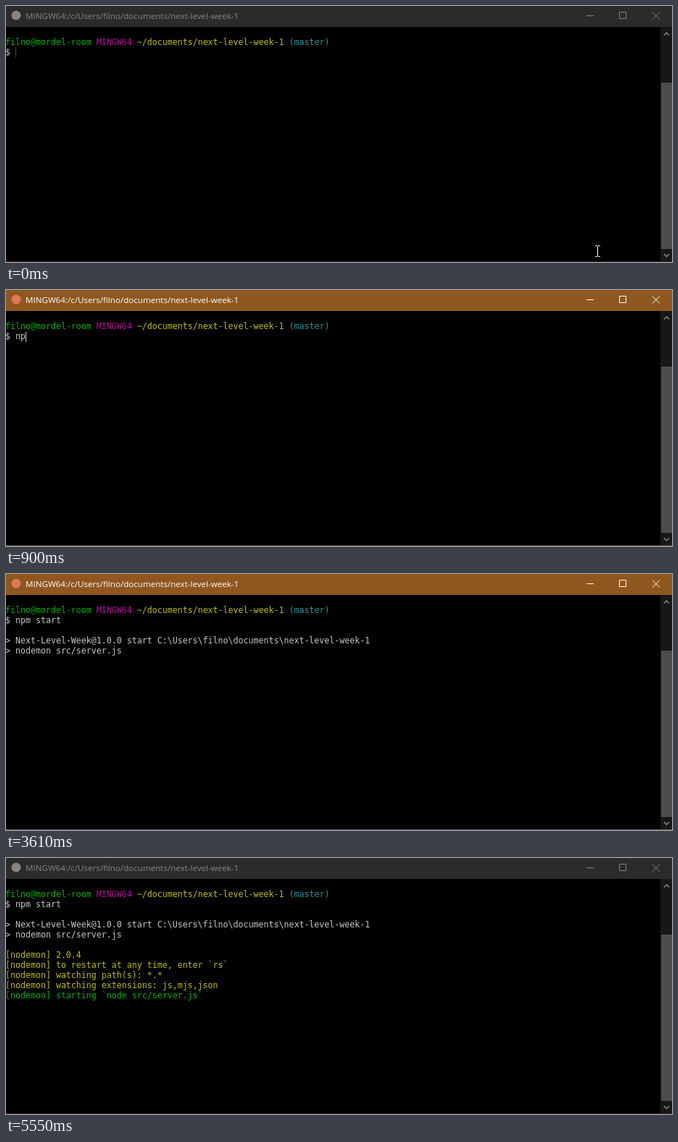
Recreate the animation shown at these times as an HTML page. Size 919 by 354 pixels, loop 5.71 s.

```html
<!DOCTYPE html>
<html lang="en">
<head>
<meta charset="utf-8">
<title>Terminal</title>
<style>
  html, body { margin: 0; width: 100%; height: 100%; overflow: hidden; background: #000; }
  #stage {
    --bar: #2b2b2b; --ink: #858585; --badge: #8c8480; --edge: #3b1a2a;
    position: relative; width: 919px; height: 354px; overflow: hidden; background: #000;
  }
  #stage.active { --bar: #8f571f; --ink: #fff; --badge: #e0785a; --edge: #6e5a58; }
  #bar { position: absolute; left: 0; top: 0; width: 919px; height: 29px; background: var(--bar); }
  #title {
    position: absolute; left: 27px; top: 0; white-space: pre; color: var(--ink);
    font: 11.6px/28px "Open Sans", "Noto Sans", sans-serif;
  }
  #term div {
    position: absolute; left: -1px; height: 14px; white-space: pre; color: #c8c8c8;
    font: 11.627px/14px "DejaVu Sans Mono", monospace;
  }
  #term .green { color: #00b400; }
  #term .magenta { color: #b4109e; }
  #term .yellow { color: #bfbf00; }
  #term .cyan { color: #1f9a9a; }
  #caret {
    position: absolute; top: 58px; width: 1px; height: 14px;
    background: repeating-linear-gradient(#8c8c8c 0 1px, #000 1px 2px);
  }
  .active #caret { background: #d0d0d0; }
  svg { position: absolute; left: 0; top: 0; }
</style>
</head>
<body>
<div id="stage">
  <div id="bar"></div>
  <div id="title">MINGW64:/c/Users/filno/documents/next-level-week-1</div>
  <div id="term">
    <div data-row="0"><span class="green">filno@mordel-room</span> <span class="magenta">MINGW64</span> <span class="yellow">~/documents/next-level-week-1</span> <span class="cyan">(master)</span></div>
    <div data-row="1">$ <span id="typed"></span></div>
    <div data-row="3" data-at="3610">&gt; Next-Level-Week@1.0.0 start C:\Users\filno\documents\next-level-week-1</div>
    <div data-row="4" data-at="3610">&gt; nodemon src/server.js</div>
    <div data-row="6" data-at="3930" class="yellow">[nodemon] 2.0.4</div>
    <div data-row="7" data-at="3930" class="yellow">[nodemon] to restart at any time, enter `rs`</div>
    <div data-row="8" data-at="3930" class="yellow">[nodemon] watching path(s): *.*</div>
    <div data-row="9" data-at="3930" class="yellow">[nodemon] watching extensions: js,mjs,json</div>
    <div data-row="10" data-at="4000" class="green">[nodemon] starting `node src/server.js`</div>
  </div>
  <div id="caret"></div>
  <svg width="919" height="354" fill="none">
    <circle cx="14" cy="13" r="6.5" fill="var(--badge)"/>
    <g stroke="var(--ink)">
      <path d="M801 13.5h10M846.5 8.5h9v9h-9z"/>
      <path d="M892 8.500l10 10m0-10l-10 10"/>
    </g>
    <rect x="903" y="29" width="16" height="325" fill="#171717"/>
    <rect x="904" y="106" width="15" height="230" fill="#4d4d4d"/>
    <path d="M908 40.500l3.500-3.500 3.500 3.500M908 343l3.500 3.500 3.500-3.500" stroke="#8a8a8a" stroke-width="1.500"/>
    <rect y="353" width="919" height="1" fill="var(--edge)"/>
    <path id="mouse" d="M-3 .5h3m1 0h3M.5 1v14M-3 15.500h3m1 0h3" stroke="#fff"/>
  </svg>
</div>
<script>
  const LOOP = 5710;
  const COMMAND = "npm start";
  const KEY_TIMES = [670, 900, 980, 1210, 1280, 1680, 1830, 1910, 2140];
  const CARET_OFF = 2520;
  const FOCUS = [210, 5550];

  // [time, x, y]; no position means the pointer is hidden
  const POINTER = [
    [0, 816, 331], [70, 811, 316], [140, 802, 295], [210, 799, 285], [290, 797, 289],
    [670],
    [3700, 797, 289], [3780, 812, 280], [3850, 835, 276], [3930, 853, 284],
    [4000, 852, 303], [4080, 848, 325], [4160, 844, 344],
    [4240]
  ];

  const get = id => document.getElementById(id);
  const stage = get("stage"), typed = get("typed"), caret = get("caret"), mouse = get("mouse");
  const show = (el, on) => { el.style.visibility = on ? "visible" : "hidden"; };

  const lines = [...document.querySelectorAll("[data-row]")];
  for (const line of lines) line.style.top = 43 + 14 * line.dataset.row + "px";

  function draw(t) {
    stage.classList.toggle("active", t >= FOCUS[0] && t < FOCUS[1]);

    const count = KEY_TIMES.filter(k => k <= t).length;
    typed.textContent = COMMAND.slice(0, count);
    caret.style.left = 13 + 7 * count + "px";
    show(caret, t < CARET_OFF);

    for (const line of lines) show(line, t >= (line.dataset.at || 0));

    const [, x, y] = POINTER.findLast(p => p[0] <= t);
    show(mouse, x !== undefined);
    if (x !== undefined) mouse.setAttribute("transform", `translate(${x} ${y})`);
  }

  const start = performance.now();
  function tick() {
    draw((performance.now() - start) % LOOP);
    requestAnimationFrame(tick);
  }
  tick();
</script>
</body>
</html>
```
